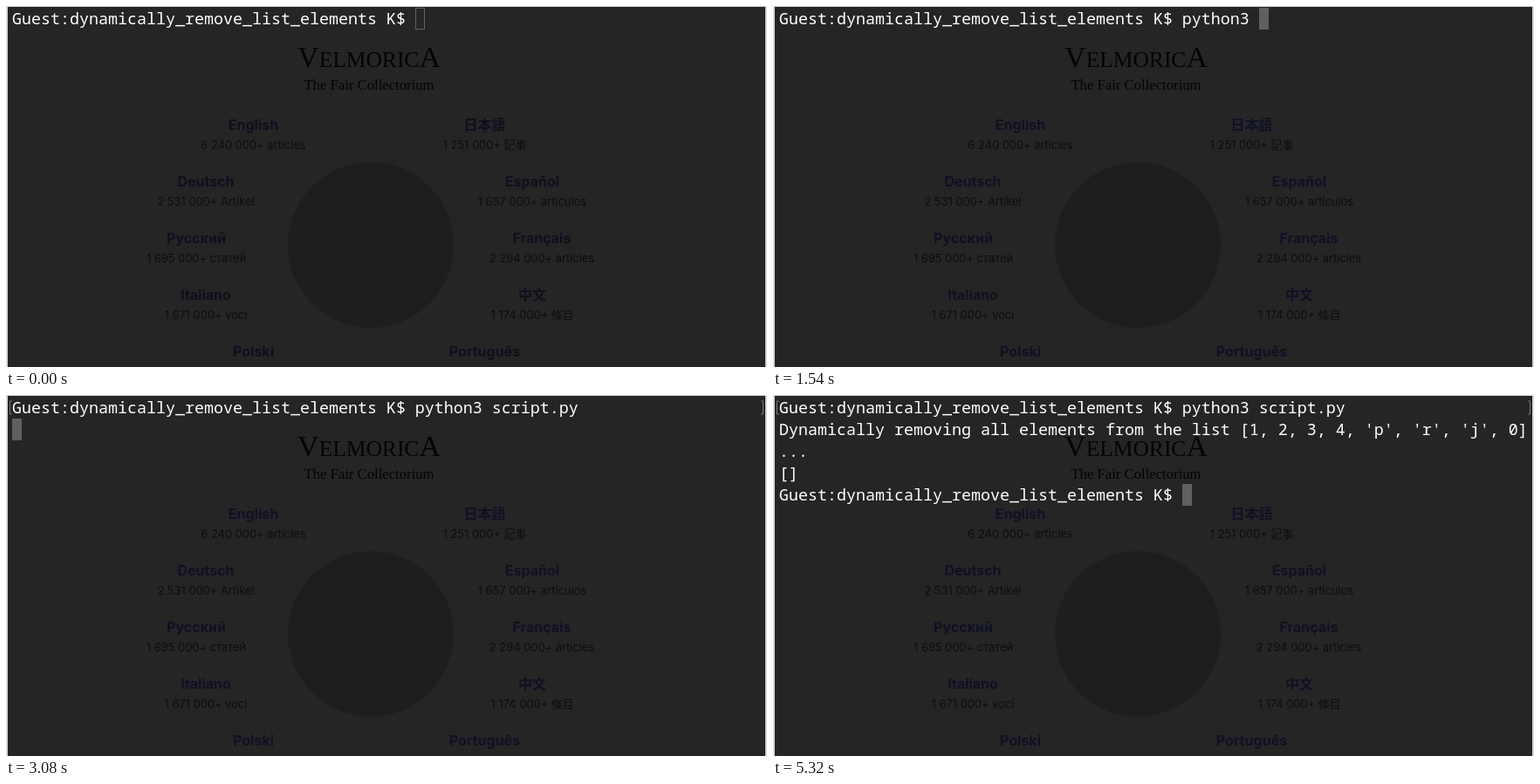
Write an HTML page that moves like this. It is 872x414 px and loops after 6090 ms.

```html
<!DOCTYPE html>
<html lang="en">
<head>
<meta charset="utf-8">
<title>Terminal</title>
<style>
  html, body { margin: 0; width: 100%; height: 100%; overflow: hidden; background: #252525; }
  svg { display: block; }
  .term { font: 500 18.33px "Noto Sans Mono", "DejaVu Sans Mono", monospace; fill: #fff; white-space: pre; }
  .page { text-anchor: middle; fill: #040404; }
  .serif { font-family: "Liberation Serif", serif; }
  .lang { font: 700 16px Inter, "Noto Sans CJK JP", "Noto Sans CJK SC", "Noto Sans CJK", sans-serif; }
  .count { font: 400 12.9px Inter, "Noto Sans CJK JP", "Noto Sans CJK SC", "Noto Sans CJK", sans-serif; fill: #0e0e0e; }
</style>
</head>
<body>
<svg width="872" height="414" viewBox="0 0 872 414">
  <rect width="872" height="414" fill="#252525"/>
  <g class="page">
    <circle cx="418" cy="274" r="95" fill="#1e1e1e"/>
    <text class="serif" x="416" y="70" font-size="25.5"><tspan font-size="34">V</tspan>ELMORIC<tspan font-size="34">A</tspan></text>
    <text class="serif" x="416" y="96" font-size="16.7">The Fair Collectorium</text>
    <g id="langs"></g>
  </g>
  <rect id="cursor" width="11" height="25"/>
  <g id="lines" class="term"></g>
  <path id="marks" d="M7 7H4.5V22H7M865 7H867.5V22H865" fill="none" stroke="#777"/>
  <path d="M0 414V0H872V414H870V1H2V414Z" fill="#d8d8d8"/>
</svg>
<script>
const LOOP = 6090, FOCUS = 560, ENTER = 3080, OUTPUT = 3220;
const CELL = 11, ROW = 25, LEFT = 7;
const PROMPT = 'Guest:dynamically_remove_list_elements K$ ';
const COMMAND = 'python3 script.py';
const RESULT = [
  "Dynamically removing all elements from the list [1, 2, 3, 4, 'p', 'r', 'j', 0]",
  '...', '[]', PROMPT
];
// [time in ms, characters typed so far]
const KEYS = [
  [910, 1], [1190, 3], [1260, 4], [1330, 5], [1400, 6], [1470, 7], [1540, 8],
  [1680, 9], [1820, 10], [1960, 11], [2030, 13], [2170, 14], [2310, 15],
  [2520, 16], [2730, 17]
];
const LANGS = [
  [283.5, 'English', '6 240 000+ articles', 548.5, '日本語', '1 251 000+ 記事'],
  [229, 'Deutsch', '2 531 000+ Artikel', 603, 'Español', '1 657 000+ artículos'],
  [218, 'Русский', '1 695 000+ статей', 614, 'Français', '2 294 000+ articles'],
  [229, 'Italiano', '1 671 000+ voci', 603, '中文', '1 174 000+ 條目'],
  [283.5, 'Polski', '', 548.5, 'Português', '']
];

const byId = id => document.getElementById(id);
const langs = byId('langs'), cursor = byId('cursor'), marks = byId('marks');

function set(el, attrs) {
  for (const key in attrs) el.setAttribute(key, attrs[key]);
}

function addText(parent, x, y, text, cls) {
  const el = document.createElementNS('http://www.w3.org/2000/svg', 'text');
  set(el, { x, y, class: cls });
  el.textContent = text;
  parent.append(el);
  return el;
}

LANGS.forEach((row, i) => {
  for (const k of [0, 3]) {
    const [x, name, count] = row.slice(k, k + 3);
    addText(langs, x, 142 + i * 65, name, 'lang');
    if (count) addText(langs, x, 164 + i * 65, count, 'count');
  }
});

const lines = Array.from({ length: 5 }, (_, i) =>
  addText(byId('lines'), LEFT, 21 + i * ROW, '', 'term'));

function screenAt(t) {
  const typed = KEYS.reduce((n, [time, count]) => t >= time ? count : n, 0);
  const rows = [PROMPT + COMMAND.slice(0, typed)];
  if (t >= OUTPUT) rows.push(...RESULT);
  else if (t >= ENTER) rows.push('');
  return rows;
}

function draw(t) {
  const rows = screenAt(t), last = rows.length - 1, focused = t >= FOCUS;
  lines.forEach((el, i) => {
    const text = rows[i] || '';
    if (el.textContent !== text) el.textContent = text;
  });
  const inset = focused ? 0 : 0.5;
  set(cursor, {
    x: LEFT + rows[last].length * CELL + inset,
    y: 2 + last * ROW + inset,
    width: CELL - 2 * inset,
    height: ROW - 2 * inset,
    fill: focused ? '#606060' : 'none',
    stroke: focused ? 'none' : '#606060'
  });
  set(langs, { fill: focused ? '#101125' : '#0f101e' });
  set(marks, { visibility: t >= ENTER ? 'visible' : 'hidden' });
}

const start = performance.now();
function tick() {
  draw((performance.now() - start) % LOOP);
  requestAnimationFrame(tick);
}
tick();
</script>
</body>
</html>
```
